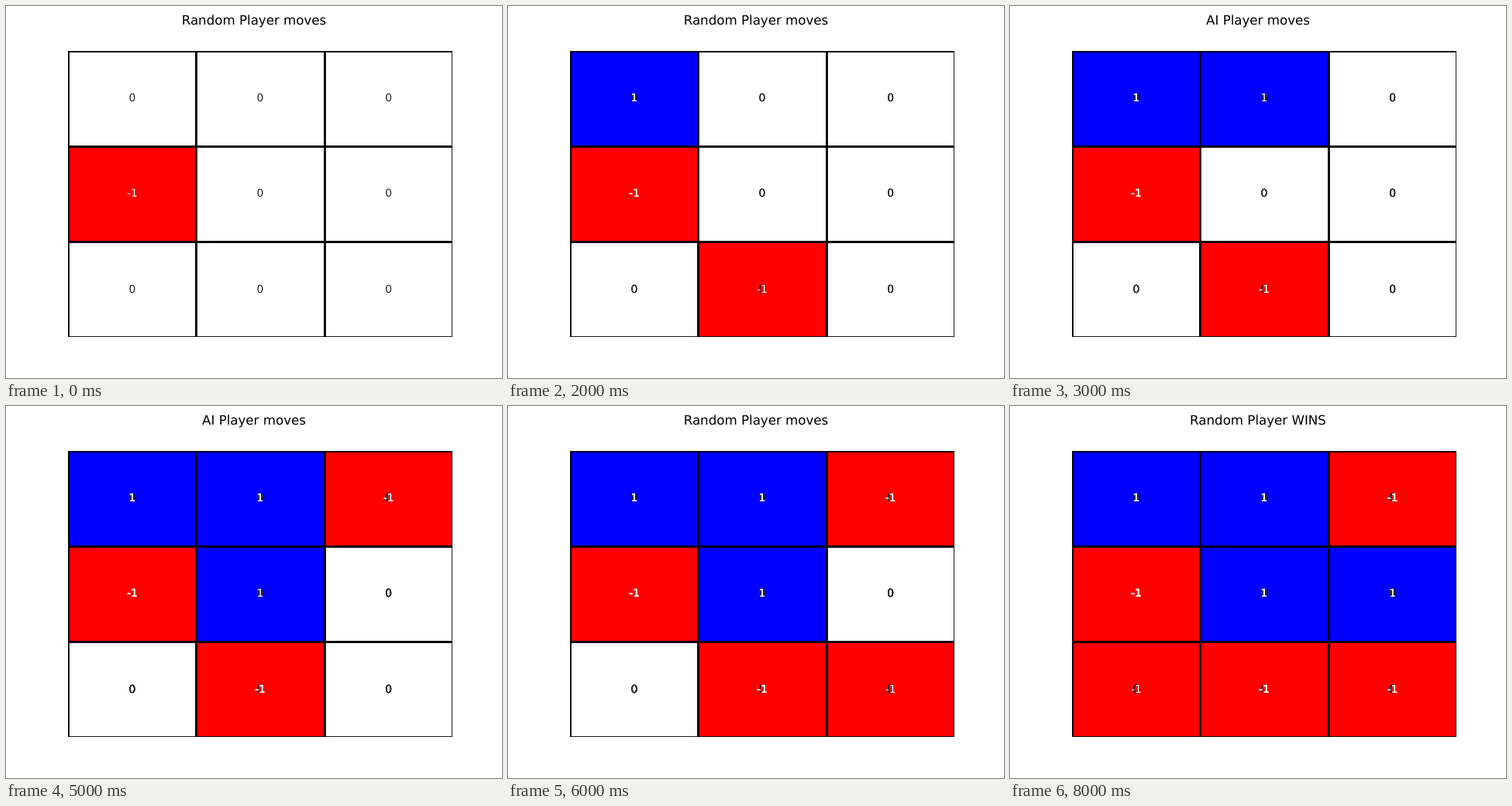
An HTML page that plays this animation: 640 by 480 pixels, repeating every 9 s.

```html
<!DOCTYPE html>
<html lang="en">
<head>
<meta charset="utf-8">
<style>
  html, body { margin: 0; width: 100%; height: 100%; overflow: hidden; background: #fff; }
  svg { display: block; width: 640px; height: 480px; }
  text { font-family: "DejaVu Sans", sans-serif; text-anchor: middle; text-rendering: geometricPrecision; }
</style>
</head>
<body>
<svg viewBox="0 0 640 480">
  <clipPath id="axes"><rect x="80" y="58" width="496" height="369"/></clipPath>
  <text id="title" x="320" y="24" font-size="16.667"></text>
  <g id="cells" clip-path="url(#axes)" stroke="#000" stroke-width="2.78"></g>
  <g id="labels" font-size="13.889"></g>
</svg>
<script>
const STEP = 1000;
const moves = [3, 0, 7, 1, 2, 4, 8, 5, 6];
const edgesX = [80.5, 245.5, 411.5, 576.5];
const edgesY = [58.5, 181.5, 304.5, 427.5];
const labelX = [163, 328, 493.6];
const baselines = [123, 246, 370];
const fills = { '-1': '#f00', 0: '#fff', 1: '#00f' };

const byId = id => document.getElementById(id);

function add(parent, tag, attrs) {
  const el = document.createElementNS('http://www.w3.org/2000/svg', tag);
  for (const key in attrs) el.setAttribute(key, attrs[key]);
  return parent.appendChild(el);
}

function valueAt(cell, step) {
  const turn = moves.indexOf(cell);
  return turn > step ? 0 : turn % 2 ? 1 : -1;
}

const cells = moves.map((_, i) => {
  const col = i % 3, row = Math.floor(i / 3);
  return add(byId('cells'), 'rect', {
    x: edgesX[col], y: edgesY[row],
    width: edgesX[col + 1] - edgesX[col], height: edgesY[row + 1] - edgesY[row]
  });
});

// Each turn prints its labels over those of the earlier turns.
const layers = moves.map((_, step) => {
  const layer = add(byId('labels'), 'g', {});
  moves.forEach((_, i) => {
    const value = valueAt(i, step);
    add(layer, 'text', {
      x: labelX[i % 3], y: baselines[Math.floor(i / 3)],
      fill: value ? '#fff' : '#262626'
    }).textContent = value;
  });
  return layer;
});

function titleAt(step) {
  if (step === moves.length - 1) return 'Random Player WINS';
  return (step % 2 ? 'AI' : 'Random') + ' Player moves';
}

let shown = -1;
function render(time) {
  const step = Math.floor(time / STEP) % moves.length;
  if (step === shown) return;
  shown = step;
  byId('title').textContent = titleAt(step);
  cells.forEach((cell, i) => cell.setAttribute('fill', fills[valueAt(i, step)]));
  layers.forEach((layer, i) => layer.setAttribute('display', i <= step ? 'inline' : 'none'));
}

const start = performance.now();
function tick() {
  render(performance.now() - start);
  requestAnimationFrame(tick);
}
tick();
</script>
</body>
</html>
```
